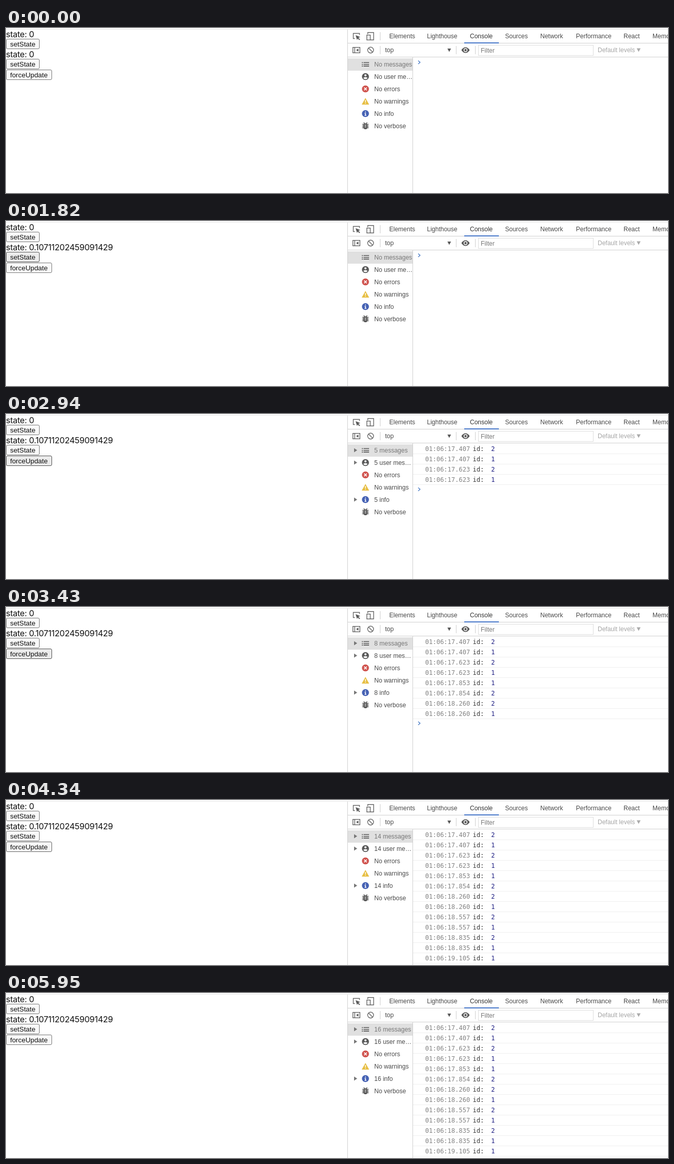
These frames come from a looping animation (1280x321 px, 6160 ms). An HTML page:

```html
<!DOCTYPE html>
<html lang="en">
<head>
<meta charset="utf-8">
<title>setState and forceUpdate</title>
<style>
  html, body { margin: 0; width: 100%; height: 100%; overflow: hidden; background: #fff; }
  svg { display: block; width: 1280px; height: 321px; }
  text { white-space: pre; }
  .page { font: 16px Inter, sans-serif; letter-spacing: -.25px; fill: #111; }
  .btn text { font: 13.333px "Liberation Sans", Arial, sans-serif; fill: #111; }
  .btn rect { fill: #f8f8f8; stroke: #777; }
  .btn.hover rect { fill: #ebebeb; stroke: #4f4f4f; }
  .btn.active rect { fill: #f5f5f5; stroke: #636363; }
  .ui { font: 12px "Liberation Sans", Arial, sans-serif; fill: #4a4a4a; }
  .ui .on { fill: #333; }
  .ui .dim { fill: #a6a6a6; }
  .ui .soft { fill: #777; }
  .log { font: 12px "DejaVu Sans Mono", monospace; }
  .log .time { fill: #828282; }
  .log .key { fill: #333; }
  .log .num { fill: #1b1b80; }
  .line { stroke: #cfcfcf; fill: none; }
  .icon { fill: none; stroke: #666; stroke-width: 1.4; }
  .solid { fill: #595959; }
</style>
</head>
<body>
<svg viewBox="0 0 1280 321">
  <path class="line" d="M0 2.5H1280" style="stroke:#e6e6e6"/>
  <g class="page">
    <text x="0" y="18">state: 0</text>
    <text id="state" x="0" y="57">state: 0</text>
  </g>
  <g id="buttons"></g>

  <path class="line" d="M660.5 3V321M661 29.5H1280M661 56.5H1280M786.5 57V321"/>
  <path class="line" d="M723.5 8V24M723.5 35V51M870.5 35V51M907.5 35V51"/>
  <rect x="886" y="28" width="67" height="2" fill="#4676c8"/>

  <g class="icon">
    <path d="M674.5 20.5H671.5V10.5H683.5V13.5"/>
    <path class="solid" stroke="none" d="M676 14L685 17.6 681.4 19 684.6 22.2 683.2 23.6 680 20.4 678.8 23.4Z"/>
    <path d="M699.5 12V8.7H710.8V23.3H705"/>
    <rect x="697.7" y="13.7" width="6.6" height="9.6"/>
    <rect x="670.7" y="37.7" width="13.6" height="10.6"/>
    <path d="M674.3 38V48"/>
    <path class="solid" stroke="none" d="M681.5 40V46L677 43Z"/>
    <circle cx="705" cy="43" r="5.7"/>
    <path d="M701 39L709 47"/>
    <path class="solid" stroke="none" d="M880.5 43Q884 37.5 888.5 37.5T896.5 43Q893 48.5 888.5 48.5T880.5 43Z"/>
    <circle cx="888.5" cy="43" r="3" stroke="#fff" stroke-width="1.3"/>
  </g>
  <rect x="913.5" y="33.5" width="222" height="20" fill="#fff" stroke="#dcdcdc"/>
  <path class="solid" d="M853.5 40H860.5L857 46.5Z"/>
  <path fill="#ababab" d="M1219.5 39.5H1227L1223.2 46.5Z"/>

  <g class="ui">
    <g id="tabs"></g>
    <text x="733" y="47">top</text>
    <text class="soft" x="918" y="48">Filter</text>
    <text class="dim" x="1144" y="47">Default levels</text>
  </g>

  <rect x="661" y="59" width="125" height="24" fill="#e0e0e0"/>
  <g id="side" class="ui"></g>

  <g class="solid">
    <path d="M688 66.5h2v1.6h-2zm0 3.4h2v1.6h-2zm0 3.4h2v1.6h-2zM691.3 66.5H702v1.6H691.3zm0 3.4H702v1.6H691.3zm0 3.4H702v1.6H691.3z"/>
    <circle cx="695" cy="94.5" r="6.8"/>
    <g fill="#fff">
      <circle cx="695" cy="92" r="2.1"/>
      <path d="M690.9 97.5Q692 95.4 695 95.4T699.1 97.5Q697.6 99.6 695 99.6T690.9 97.5Z"/>
    </g>
    <circle cx="695" cy="118.5" r="6.8" fill="#d0544f"/>
    <path d="M692.4 115.9L697.6 121.1M697.6 115.9L692.4 121.1" stroke="#fff" stroke-width="1.5"/>
    <path d="M695 136L702.2 149H687.8Z" fill="#e7bf45"/>
    <path d="M694.2 140.3h1.6v4h-1.6zm0 5.2h1.6v1.6h-1.6z" fill="#fff"/>
    <circle cx="695" cy="166.5" r="6.8" fill="#4662b4"/>
    <path d="M694.2 162.6h1.7v1.7h-1.7zm-.9 2.9h2.6v4h1v1.2h-3.6v-1.2h1v-2.8h-1z" fill="#fff"/>
    <rect x="691" y="185.5" width="8" height="11.5" rx="4"/>
    <path d="M691.6 183.8L693.5 186M698.4 183.8L696.5 186M688.7 187.5H701.3M688.7 190.8H701.3M688.7 194.1H701.3" stroke="#595959" stroke-width="1.5"/>
    <path d="M693.4 189.2H696.6M693.4 192.4H696.6" stroke="#fff" stroke-width="1.3"/>
  </g>

  <g id="log" class="log"></g>
  <path id="prompt" d="M797 63.5L800.6 66.7 797 69.9" fill="none" stroke="#4a7cc6" stroke-width="1.4"/>
</svg>
<script>
const LOOP = 6160;
const $ = id => document.getElementById(id);

function add(parent, tag, attrs, text) {
  const el = document.createElementNS('http://www.w3.org/2000/svg', tag);
  for (const k in attrs) el.setAttribute(k, attrs[k]);
  if (text !== undefined) el.textContent = text;
  return parent.appendChild(el);
}

function button(y, w, label) {
  const g = add($('buttons'), 'g', { class: 'btn' });
  add(g, 'rect', { x: .5, y: y + .5, width: w - 1, height: 19, rx: 2.5 });
  add(g, 'text', { x: 8, y: y + 15 }, label);
  return g;
}
button(21, 65, 'setState');
const setBtn = button(60, 65, 'setState');
const forceBtn = button(81, 89, 'forceUpdate');

[['Elements', 741], ['Lighthouse', 814], ['Console', 897], ['Sources', 965],
 ['Network', 1033], ['Performance', 1102], ['React', 1194], ['Memory', 1250]]
  .forEach(([name, x]) => add($('tabs'), 'text', { x, y: 20, class: name === 'Console' ? 'on' : '' }, name));

// Sidebar: label for a message count, and whether the row can expand
const groups = [
  [n => `${n || 'No'} messages`, true],
  [n => n ? `${n} user me${n < 10 ? 's' : ''}…` : 'No user me…', true],
  [() => 'No errors'],
  [() => 'No warnings'],
  [n => `${n || 'No'} info`, true],
  [() => 'No verbose']
].map(([label, opens], i) => {
  const y = 70.5 + 24 * i;
  return {
    label,
    text: add($('side'), 'text', { x: 712, y: y + 4.5, class: i ? '' : 'soft' }),
    arrow: opens && add($('side'), 'path', { d: `M673 ${y - 4}L679 ${y}L673 ${y + 4}Z`, fill: '#777' })
  };
});

const rows = ['17.407 2', '17.407 1', '17.623 2', '17.623 1', '17.853 1', '17.854 2', '18.260 2',
  '18.260 1', '18.557 2', '18.557 1', '18.835 2', '18.835 1', '19.105 1'].map((row, i) => {
  const [sec, id] = row.split(' ');
  const y = 72 + 20 * i;
  const g = add($('log'), 'g', {});
  add(g, 'path', { d: `M787 ${y + 5.5}H1280`, stroke: '#efefef' });
  add(g, 'text', { x: 810.5, y, class: 'time' }, '01:06:' + sec);
  add(g, 'text', { x: 902.5, y, class: 'key' }, 'id:');
  add(g, 'text', { x: 938, y, class: 'num' }, id);
  return g;
});

// Steps: [time, value]
const stateSteps = [[0, '0'], [1470, '0.60384952967420358'], [1750, '0.10711202459091429']];
const setSteps = [[0, ''], [910, 'hover'], [1330, 'active'], [1470, 'hover'], [1610, 'active'],
  [1750, 'hover'], [2170, '']];
const forceSteps = [[0, ''], [2240, 'hover'], [2380, 'active'], [2520, 'hover'], [2590, 'active'],
  [2730, 'hover'], [2870, 'active'], [2940, 'hover'], [3220, 'active'], [3360, 'hover'],
  [3570, 'active'], [3710, 'hover'], [3850, 'active'], [3990, 'hover'], [4130, 'active'],
  [4270, 'hover'], [4340, 'active'], [4480, 'hover'], [4760, '']];
const countSteps = [[0, 0], [2520, 2], [2730, 4], [2940, 5], [3010, 6], [3360, 8], [3710, 10],
  [3990, 12], [4270, 14], [4480, 16]];

const at = (steps, t) => steps.findLast(s => s[0] <= t)[1];

function draw(t) {
  const count = at(countSteps, t);
  const shown = count - count % 2; // rows arrive in pairs
  $('state').textContent = 'state: ' + at(stateSteps, t);
  setBtn.setAttribute('class', 'btn ' + at(setSteps, t));
  forceBtn.setAttribute('class', 'btn ' + at(forceSteps, t));
  for (const { label, text, arrow } of groups) {
    text.textContent = label(count);
    if (arrow) arrow.style.display = count ? '' : 'none';
  }
  rows.forEach((row, i) => row.style.display = i < shown ? '' : 'none');
  $('prompt').setAttribute('transform', `translate(0 ${shown * 19.95})`);
}

const start = performance.now();
function tick() {
  draw((performance.now() - start) % LOOP);
  requestAnimationFrame(tick);
}
tick();
</script>
</body>
</html>
```
